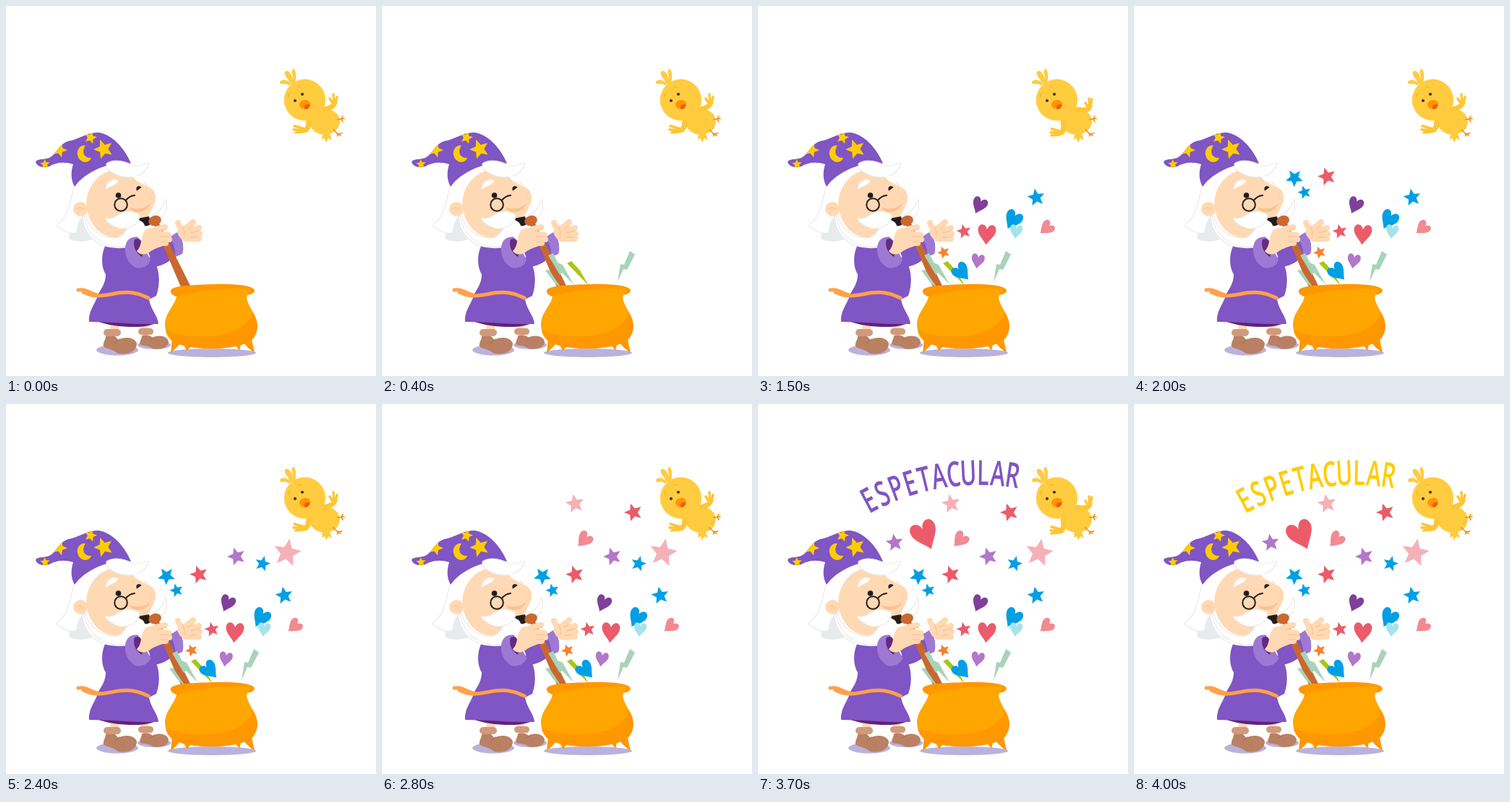
Write an HTML page that moves like this. It is 512 px wide and 512 px high and loops after 4.1 s.

```html
<!DOCTYPE html>
<html lang="pt">
<head>
<meta charset="utf-8">
<title>Espetacular</title>
<style>
  html, body { margin: 0; width: 100%; height: 100%; overflow: hidden; background: #fff; }
  svg { display: block; width: 100vw; height: 100vh; }
  .line { fill: none; stroke-linecap: round; stroke-linejoin: round; }
  .hair { fill: #fff; stroke: #e9ebeb; stroke-width: 1.2; stroke-linejoin: round; }
  .skin { fill: #ffd9b3; }
  .fingers { stroke: #ffd9b3; stroke-width: 8; }
  .crease { stroke: #f6bd8d; stroke-width: 1; }
  .robe { fill: #8055c4; }
  .cuff { fill: #9d79d3; }
  .dark { fill: #5e2277; }
  .gold { fill: #ffcc00; }
  .wing { stroke: #ffc533; }
  .claw { stroke: #f88b0d; stroke-width: 1.7; }
  text { font: 600 48px "Open Sans", "Noto Sans", sans-serif; text-anchor: middle; }
</style>
</head>
<body>
<svg viewBox="0 0 512 512">
  <defs>
    <path id="hat" d="M95 250C89 240 90 228 93 219C80 215 68 217 60 222C51 225 43 222 41 216C42 211 52 213 60 210C70 205 72 192 86 187C100 185 112 175 127 175C147 177 165 198 173 218C150 214 112 226 95 250Z"/>
    <clipPath id="hatClip"><use href="#hat"/></clipPath>
  </defs>

  <g fill="#bab1dc">
    <ellipse cx="154" cy="476" rx="29" ry="7.500"/>
    <ellipse cx="205" cy="469" rx="23" ry="6"/>
    <ellipse cx="285" cy="480" rx="61" ry="6"/>
  </g>

  <!-- legs -->
  <path class="skin" d="M145 435L157 437L155 451L144 451ZM187 439L197 439L197 450L189 450Z"/>
  <g fill="#ba8063">
    <path d="M138 457C145 453 152 456 155 462C164 457 178 458 181 467C181 479 168 483 155 481C149 475 138 474 135 471C134 465 138 462 138 457Z"/>
    <path d="M188 456C194 454 200 456 203 459C212 454 224 457 225 465C224 474 212 476 203 474C198 470 190 470 186 469C184 464 188 461 188 456Z"/>
  </g>
  <path class="line" stroke="#a16a50" d="M151 467Q153 462 157 461M200 462Q202 459 206 458"/>
  <g fill="#d09a7c">
    <rect x="135" y="447" width="24" height="10" rx="5"/>
    <rect x="183" y="446" width="21" height="9" rx="4.500"/>
  </g>

  <!-- robe -->
  <path class="dark" d="M121 434Q160 440 210 437Q200 445 170 444Q140 443 121 434Z"/>
  <path class="robe" d="M138 331C150 328 160 333 168 333L203 350C213 363 214 384 208 401L198 406C200 420 210 428 211 440C180 441 143 437 115 437C114 421 124 412 127 400C133 389 138 383 138 371C131 361 132 340 138 331Z"/>
  <g class="line" stroke="#ffa24a" stroke-width="5">
    <path d="M124 401C148 402 164 388 197 404"/>
    <path d="M126 400C116 398 112 391 100 393M124 400C117 402 113 398 107 396"/>
  </g>
  <path class="robe" d="M196 338L238 314C246 324 247 337 242 344C230 347 222 360 204 361Z"/>
  <path class="cuff" d="M226 320L237 313C245 322 247 337 244 343L234 347C235 336 231 327 226 320Z"/>

  <!-- head -->
  <path fill="#e7ebeb" d="M101 285C97 300 86 313 87 322C96 327 108 327 119 323Z"/>
  <path class="hair" d="M96 247C87 265 92 285 70 304C78 312 92 317 98 313C98 301 106 291 107 289C104 310 121 332 148 334C174 337 201 326 207 309L172 244L176 228C151 213 115 222 96 247Z"/>
  <path class="skin" d="M111 276C111 250 128 229 151 227C174 227 190 238 197 252L204 276C196 298 181 314 154 321C132 321 114 303 111 276Z"/>
  <path class="hair" stroke="none" d="M108 284C114 308 131 322 152 321C164 319 168 306 174 297L203 291L214 309C210 326 186 335 160 333C128 333 108 311 108 284Z"/>
  <ellipse class="skin" cx="103" cy="281" rx="10" ry="10"/>
  <path class="line crease" d="M98 280Q103 277 108 282"/>
  <use href="#hat" class="robe"/>
  <g id="hatStars" class="gold" clip-path="url(#hatClip)">
    <path d="M106 193C95 197 97 214 109 216C114 216 117 213 118 210C108 211 104 202 110 193Z"/>
  </g>
  <path class="hair" d="M139 218C151 210 167 216 177 221C187 223 193 217 198 217C195 228 187 236 171 237C157 237 145 231 139 224Z"/>
  <g fill="#fff">
    <path d="M138 254C138 244 147 238 155 241C154 248 145 248 138 254Z"/>
    <path d="M176 236C184 233 191 240 193 250C187 243 178 243 176 236Z"/>
  </g>
  <g fill="#241c1c">
    <circle cx="155.500" cy="262" r="3.800"/>
    <circle cx="184" cy="253" r="3.700"/>
    <path d="M182 294L204 290C204 300 198 306 192 304C190 297 186 299 182 294Z"/>
  </g>
  <path class="hair" d="M198 291C212 288 218 279 221 267C226 284 217 296 202 298Z"/>
  <path class="hair" d="M137 293C150 298 154 285 170 284C181 284 187 289 184 295C178 307 161 312 148 304C143 301 138 298 137 293Z"/>
  <path class="skin" d="M170 276C172 263 181 254 190 250C201 248 208 257 207 268C205 282 193 287 179 286C172 285 169 281 170 276Z"/>
  <path fill="#fbc08f" d="M201 262C204 275 191 284 171 279C178 290 203 287 201 262Z"/>
  <g class="line" stroke="#241c1c" stroke-width="2">
    <circle cx="159" cy="275" r="8.800"/>
    <path d="M166 269Q170 263 178 262"/>
  </g>

  <!-- stick and hands -->
  <g fill="#c9682f">
    <ellipse cx="206" cy="297" rx="9" ry="7" transform="rotate(-20 206 297)"/>
    <path d="M204 300L212 301L257 391L243 391Z"/>
  </g>
  <path class="cuff" d="M165 334C166 323 174 318 183 320L200 351C198 360 188 364 179 362C169 356 164 346 165 334Z"/>
  <path class="dark" fill-opacity=".9" d="M178 323C188 318 193 334 188 347C179 342 175 331 178 323Z"/>
  <path class="skin" d="M181 339C189 332 185 321 192 311C200 303 213 309 219 316L226 325C220 334 207 333 198 341C190 346 183 343 181 339Z"/>
  <path class="line fingers" stroke-width="6" d="M207 309L220 306M211 315L225 317M212 322L226 323M212 328L221 328"/>
  <path class="line crease" d="M211 312Q216 309 222 309M214 319H225M214 326H224"/>
  <path class="skin" d="M237 314C240 303 252 301 260 311C266 321 256 328 247 326L241 321Z"/>
  <path class="line fingers" d="M243 312L238 300M249 307L259 299M254 311L267 307M254 317L268 315M253 322L267 322"/>
  <path class="line crease" d="M244 304Q248 312 247 319M252 309L260 304M256 314L267 311M254 320L264 320"/>

  <g id="magic"></g>

  <!-- cauldron -->
  <g fill="#ff9700">
    <path d="M230 458L228 480Q236 473 241 467ZM339 457L344 480Q334 473 329 466ZM246 469L250 477L256 471ZM317 469L323 477L325 468Z"/>
    <path fill="#ffa600" d="M236 396C238 412 220 422 220 441C220 463 241 474 285 474C325 474 348 464 348 443C348 425 331 415 333 397Z"/>
    <path d="M221 449C262 464 329 461 342 424C350 437 350 455 338 464C312 478 248 477 229 463Q222 456 221 449Z"/>
    <path d="M228 396C225 386 260 386 288 385C324 384 344 388 344 394C342 400 333 400 333 399C300 390 262 396 236 402Q229 400 228 396Z"/>
    <path fill="#ffa600" d="M236 402C265 394 302 390 338 391C338 396 333 399 333 405L238 409Z"/>
  </g>

  <!-- chick -->
  <g fill="#ffcc40">
    <path d="M390 110C389 105 378 111 379 105C381 100 392 102 394 109ZM393 108C391 99 384 97 386 91C391 86 398 98 398 107ZM397 107C399 97 393 91 397 87C402 87 402 101 400 107Z"/>
    <path d="M438 177L437 185L441 183L443 189L446 183L451 186L448 176Z"/>
    <ellipse cx="441" cy="160" rx="21" ry="18"/>
  </g>
  <path class="line claw" d="M459 157L468 156M464 156L466 153M464 157L466 160M453 171L459 177L465 176M459 177L463 179M459 177L459 180"/>
  <g class="line wing" id="wingUp"></g>
  <g class="line wing" id="wingDown"></g>
  <circle cx="413.500" cy="130" r="28.700" fill="#ffcc40"/>
  <g class="line" stroke="#f9b72c" stroke-width="1.500">
    <path d="M403 113Q406 110 409 113M391 126Q390 122 393 121"/>
  </g>
  <g fill="#4a2d17"><circle cx="410" cy="122" r="2"/><circle cx="400" cy="131" r="2"/></g>
  <path fill="#ff9400" d="M406 136C408 129 418 128 421 134C422 140 418 144 413 143C409 142 406 140 406 136Z"/>
  <path fill="#f05a22" d="M413 139C415 135 419 136 420 137C420 141 416 144 413 142Z"/>

  <g id="word"></g>
</svg>
<script>
  const $ = id => document.getElementById(id);
  const BLUE = '#009fe3', RED = '#eb5c6b', PINK = '#f5b1b8', ROSE = '#f18a93',
        LILAC = '#b277c9', PLUM = '#803f98', MINT = '#a8d3b9';
  const HEART = 'M0 1C-.3 .5 -.86 .1 -.86 -.42C-.86 -1.06 -.16 -1.1 0 -.45C.16 -1.1 .86 -1.06 .86 -.42C.86 .1 .3 .5 0 1Z';
  const STAR = 'M' + Array.from({ length: 10 }, (_, i) => {
    const a = i * Math.PI / 5, r = i % 2 ? .45 : 1;
    return `${(r * Math.sin(a)).toFixed(3)} ${(-r * Math.cos(a)).toFixed(3)}`;
  }).join('L') + 'Z';

  function make(parent, tag, attrs) {
    const el = document.createElementNS('http://www.w3.org/2000/svg', tag);
    for (const k in attrs) el.setAttribute(k, attrs[k]);
    return parent.appendChild(el);
  }
  const add = (parent, d, attrs) => make(parent, 'path', { d, ...attrs });
  const place = (x, y, r, turn) => ({ transform: `translate(${x} ${y}) rotate(${turn}) scale(${r})` });

  // [step, shape, x, y, radius, turn, colour]
  const charms = [
    [5, HEART, 282, 368.5, 13.5, -42, BLUE],
    [6, HEART, 304, 353, 10.5, 10, LILAC],
    [7, STAR, 257, 341, 9, -22, '#f58233'],
    [8, STAR, 285, 312, 10.5, -12, RED],
    [9, HEART, 316.5, 316, 14.5, 4, RED],
    [11, HEART, 352.5, 296, 14, 30, BLUE],
    [10, HEART, 357, 312, 10, 8, '#a6e1ee'],
    [13, HEART, 399, 307.5, 11, 50, ROSE],
    [14, HEART, 306, 276, 12, 24, PLUM],
    [15, STAR, 385, 265, 12.5, -10, BLUE],
    [16, STAR, 236, 258, 9.5, -16, BLUE],
    [17, STAR, 267, 236, 13, -16, RED],
    [19, STAR, 222, 238, 12.5, 38, BLUE],
    [21, STAR, 355, 221, 11, 15, BLUE],
    [22, STAR, 319, 211, 13, -18, LILAC],
    [23, STAR, 389, 206, 20, 10, PINK],
    [25, HEART, 279.5, 188, 12, 42, ROSE],
    [26, STAR, 348, 150, 13, -18, RED],
    [27, STAR, 267, 138, 13.5, -10, PINK],
    [29, HEART, 231.5, 181.5, 21, -24, RED],
    [30, STAR, 189, 192, 12.5, -8, LILAC]
  ];
  const shards = [
    [1, 'M226 366L231 365L250 393L238 382Z', MINT],
    [2, 'M230 345L237 342L243 355L250 358L265 385L249 369L246 372Z', MINT],
    [3, 'M256 356L262 353L274 366L286 387Z', '#a8c813'],
    [4, 'M343 339L350 344L339 365L334 364L326 382L330 357L335 358Z', MINT]
  ];
  const magic = $('magic');
  const parts = [
    ...shards.map(([step, d, fill]) => ({ step, el: add(magic, d, { fill }) })),
    ...charms.map(([step, d, x, y, r, turn, fill]) =>
      ({ step, el: add(magic, d, { fill, ...place(x, y, r, turn) }) }))
  ];

  for (const spot of [[135, 198, 14, -20], [74, 199, 11, 20], [117, 182, 9, 15], [54, 219, 7, -5]])
    add($('hatStars'), STAR, place(...spot));

  const wing = (id, arm, fingers) => [
    add($(id), arm, { 'stroke-width': 7 }),
    add($(id), fingers, { 'stroke-width': 3.4 })
  ];
  const rest = [
    ...wing('wingUp', 'M441 143Q453 140 455 134', 'M453 136L448 128M454 134L453 122M456 134L458 126'),
    ...wing('wingDown', 'M419 157Q419 172 413 172', 'M413 170L399 166M412 172L398 171M412 174L401 175')
  ];
  const flap = [
    ...wing('wingUp', 'M442 143Q457 146 459 139', 'M457 141L453 134M459 139L458 128M460 139L462 129'),
    ...wing('wingDown', 'M422 158Q425 176 417 176', 'M418 173L406 170M416 175L405 175M417 178L406 179')
  ];

  // Narrow letters fanned out evenly on a circle
  const word = $('word');
  [...'ESPETACULAR'].forEach((letter, i) => {
    const turn = -28 + i * 3.62;
    make(word, 'text', {
      transform: `translate(306 420) rotate(${turn}) translate(0 -308) scale(.64 1)`
    }).textContent = letter;
  });

  const show = (el, on) => { el.style.display = on ? '' : 'none'; };
  function draw(now) {
    const step = Math.floor(now % 4100 / 100), odd = step % 2 === 1;
    for (const p of parts) show(p.el, step >= p.step);
    for (const el of rest) show(el, !odd);
    for (const el of flap) show(el, odd);
    show(word, step >= 31);
    word.setAttribute('fill', odd ? '#8055c4' : '#ffcc00');
  }
  const start = performance.now();
  function tick() {
    draw(performance.now() - start);
    requestAnimationFrame(tick);
  }
  tick();
</script>
</body>
</html>
```
